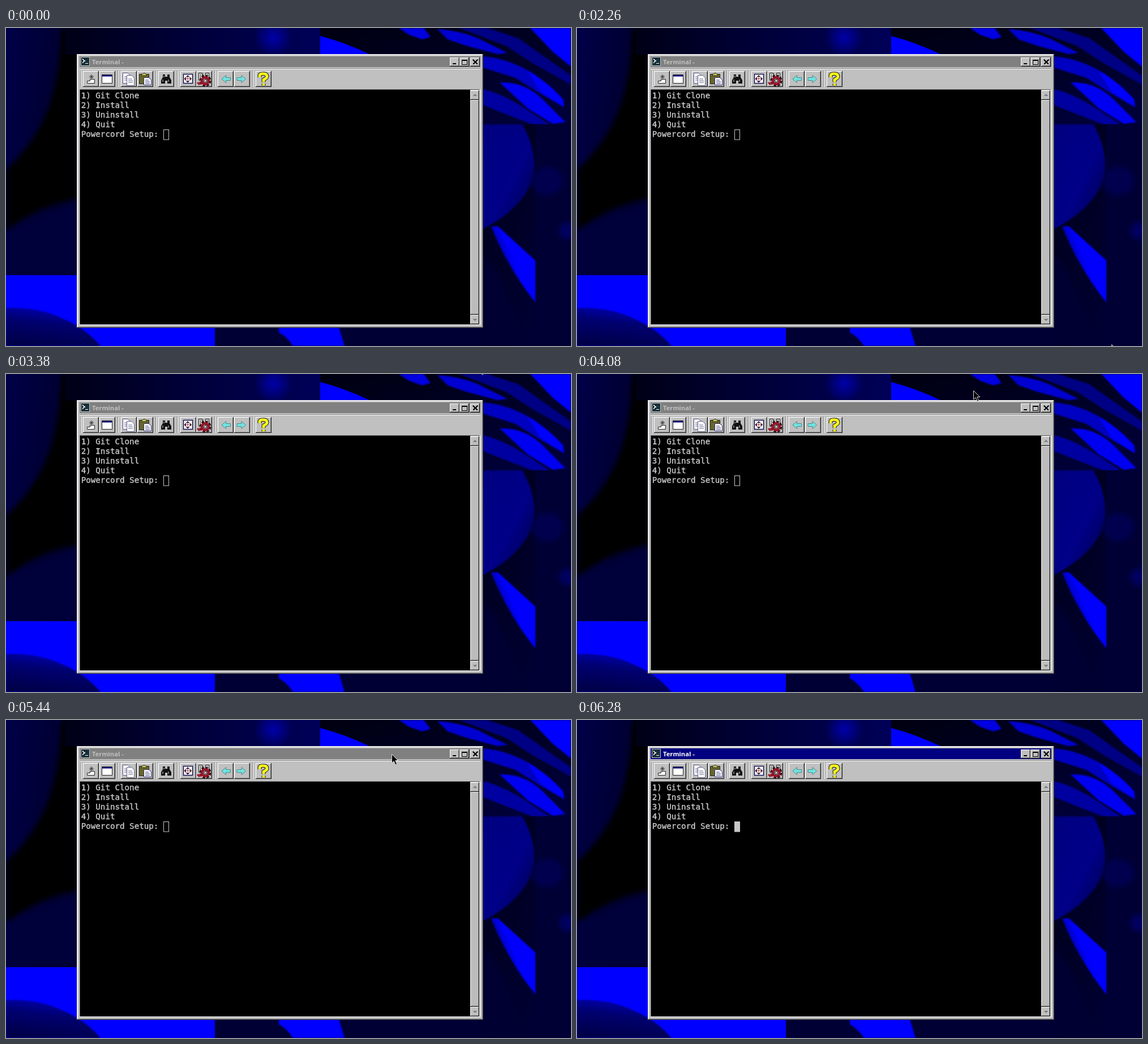
Write an HTML page that moves like this. It is 998x561 px and loops after 8000 ms.

```html
<!DOCTYPE html>
<html lang="en">
<head>
<meta charset="utf-8">
<title>Terminal</title>
<style>
  html, body { margin: 0; width: 100%; height: 100%; overflow: hidden; background: #000; }
  svg { display: block; width: 998px; height: 561px; }
  text { white-space: pre; }
  .term { font: 14.2px "DejaVu Sans Mono", monospace; fill: #c8c8c8; stroke: #c8c8c8; stroke-width: .4; }
  .title { font: bold 11.2px "Noto Sans", sans-serif; }
</style>
</head>
<body>
<svg id="stage" viewBox="0 0 998 561">
  <defs>
    <linearGradient id="left" x2="1" y2=".4"><stop stop-color="#000048"/><stop offset="1" stop-color="#000028"/></linearGradient>
    <linearGradient id="top"><stop stop-color="#000016"/><stop offset=".4" stop-color="#000034"/><stop offset="1" stop-color="#000058"/></linearGradient>
    <radialGradient id="spot"><stop stop-color="#0000a8"/><stop offset="1" stop-color="#0000a8" stop-opacity="0"/></radialGradient>
    <linearGradient id="orb" y2="1"><stop stop-color="#000080"/><stop offset=".55" stop-color="#000088"/><stop offset="1" stop-color="#000048"/></linearGradient>
    <linearGradient id="low" y2="1"><stop stop-color="#000018"/><stop offset="1" stop-color="#00003c"/></linearGradient>
    <linearGradient id="hand" x2=".7" y2="1"><stop stop-color="#000010"/><stop offset="1" stop-color="#000038"/></linearGradient>
    <linearGradient id="shard" x1=".2" y1=".75" x2=".55" y2=".5"><stop stop-color="#000050"/><stop offset="1" stop-color="#0000fc"/></linearGradient>
    <linearGradient id="mound" x1=".6" y1="0" x2=".3" y2="1"><stop stop-color="#0000b8"/><stop offset=".4" stop-color="#000070"/><stop offset="1" stop-color="#000048"/></linearGradient>
    <filter id="soft" x="-20%" y="-20%" width="140%" height="140%"><feGaussianBlur stdDeviation="5"/></filter>
    <filter id="edge"><feGaussianBlur stdDeviation="1.2"/></filter>
    <clipPath id="corner"><path d="M555 0H998V170H555Z"/></clipPath>
  </defs>

  <!-- wallpaper -->
  <rect width="998" height="561" fill="#000020"/>
  <rect width="126" height="437" fill="url(#left)"/>
  <path d="M104 0H126V300Q60 312 0 358V250Q54 200 76 138Q96 80 98 0Z" fill="#000004" filter="url(#soft)"/>
  <path d="M0 372Q62 325 126 306V436H0Z" fill="#00003a" filter="url(#soft)"/>
  <rect x="104" width="452" height="47" fill="url(#top)"/>
  <circle cx="472" cy="17" r="34" fill="url(#spot)"/>
  <g clip-path="url(#corner)">
    <rect x="555" width="443" height="170" fill="url(#hand)"/>
    <path d="M555 14Q600 26 644 47H555Z" fill="#00f"/>
    <g filter="url(#edge)">
      <path d="M694 0H738L750 16 735 20 712 12Z" fill="#0000e0"/>
      <path d="M762 2Q800 4 834 18L886 44 868 46 812 31 780 20Z" fill="#0000d0"/>
      <path d="M800 0H850L905 18 950 50 998 84V100L930 62 884 32Z" fill="#000084"/>
      <path d="M926 0H998V68L966 42Z" fill="#00f"/>
      <path d="M843 50Q890 54 934 82L984 126 986 140 944 116 900 88 843 70Z" fill="#0000c0"/>
      <path d="M922 76Q956 94 984 126L985 139 944 112Z" fill="#00f"/>
      <path d="M872 96Q914 94 946 124L988 166 966 169 922 142Z" fill="#0000f0"/>
      <path d="M843 108Q884 118 932 152L960 170H930L878 150 843 136Z" fill="#0000a0"/>
    </g>
  </g>
  <rect x="842" y="170" width="156" height="391" fill="url(#low)"/>
  <path d="M842 170H912Q940 220 931 264Q914 318 842 355Z" fill="url(#orb)" filter="url(#edge)"/>
  <rect x="935" y="170" width="63" height="391" fill="#000034"/>
  <ellipse cx="956" cy="270" rx="28" ry="25" fill="#000050" filter="url(#soft)"/>
  <ellipse cx="992" cy="358" rx="15" ry="15" fill="#000060" filter="url(#soft)"/>
  <path d="M857 350H869L935 410V484Q908 450 890 418Q870 384 857 350Z" fill="url(#shard)" filter="url(#edge)"/>
  <path d="M842 400Q885 440 916 561H842Z" fill="#000030" filter="url(#soft)"/>
  <rect y="436" width="369" height="125" fill="#00f"/>
  <path d="M0 494Q58 492 99 512Q139 528 167 561H0Z" fill="url(#mound)" filter="url(#edge)"/>
  <rect x="369" y="528" width="474" height="33" fill="#000034"/>
  <path d="M482 528H588L598 561H507Q497 545 482 537Z" fill="#00f" filter="url(#edge)"/>

  <g id="window" shape-rendering="crispEdges"></g>

  <text class="title" id="title" x="152" y="63.5">Terminal -</text>
  <g id="lines" class="term"></g>
  <rect id="caret" x="278.5" y="179.5" width="9" height="17.5" stroke="#c8c8c8"/>

  <!-- toolbar icons -->
  <g>
    <path d="M143.500 97.500V93.500H148.500V90.500H156.500V97.500Z" fill="#fff" stroke="#222"/>
    <path d="M151 82V90M147 86H155M148.500 83.500L153.500 88.500M153.500 83.500L148.500 88.500" stroke="#333"/>
    <path d="M169.500 82.500H187.500V97.500H169.500Z" fill="#fff" stroke="#222"/>
    <path d="M170 83H187V85.500H170Z" fill="#000080"/>
    <g fill="#fff" stroke="#606088">
      <path id="page" d="M206.500 79.500H215L219.500 84V97.500H206.500ZM209 86H216M209 89H217M209 92H217"/>
      <use href="#page" x="7" y="4"/>
    </g>
    <path d="M235.500 81.500H252.500V98.500H235.500Z" fill="#66662a" stroke="#222"/>
    <path d="M239.500 84V81H242L244 79 246 81H248.500V84Z" fill="#cccc55" stroke="#222"/>
    <path d="M243.500 87.500H252L256.500 91V100.500H243.500ZM246 92H252M246 95H254M246 98H254" fill="#fff" stroke="#333377"/>
    <path d="M277 82H281V86H285V82H289V87L292 92V98H285V93H281V98H274V92L277 87Z" fill="#111"/>
    <path d="M277 91V95M287 91V95M279 84V87" stroke="#ddd"/>
    <path d="M313.500 81.500H329.500V97.500H313.500Z" fill="#fff" stroke="#111150" stroke-width="1.500"/>
    <path d="M321 83L324.500 86.500H317.500ZM321 96.500L324.500 93H317.500ZM314.500 89.500L318 86V93ZM328 89.500L324.500 86V93Z" fill="#401830"/>
    <path d="M321 87V92M318.500 89.500H323.500" stroke="#aa3333"/>
    <g fill="none">
      <path d="M340.500 79.500H346.500V92H340.500ZM352.500 79.500H358.500V90H352.500Z" fill="#ddd" stroke="#222"/>
      <path d="M343.500 81V91M355.500 81V88M348 80V86" stroke="#444"/>
      <circle cx="352" cy="93" r="7" stroke="#301018" stroke-width="7" stroke-dasharray="3.600 1.900"/>
      <circle cx="352" cy="93" r="6" stroke="#981428" stroke-width="4"/>
      <circle cx="352" cy="93" r="2.500" fill="#ccc" stroke="#301018"/>
      <path d="M338 96L342 100M342 95L345 99" stroke="#981428" stroke-width="3"/>
    </g>
    <path id="arrow" d="M381 90L388.500 83.500V87.500H396.500V92.500H388.500V96.500Z" fill="#70e4e0" stroke="#508888"/>
    <use href="#arrow" transform="translate(804.500) scale(-1 1)"/>
    <g fill="none">
      <path id="ask" d="M448 87V84Q448 80.500 454.500 80.500Q461 80.500 461 85.500Q461 88.500 455 91V95.500M455 98V101.500" stroke="#333" stroke-width="7"/>
      <path d="M448 87V84Q448 80.500 454.500 80.500Q461 80.500 461 85.500Q461 88.500 455 91V95.500M455 98V101.500" stroke="#ffff18" stroke-width="4.600"/>
    </g>
  </g>

  <path id="pointer" d="M.5 .5V16L4 12.500 7 19 9.500 18 6.800 11.500H11.500Z" fill="#000" stroke="#d8d8d8"/>
  <g id="beam" fill="none">
    <path id="stem" d="M-4 -8.500H-1.500L0 -7 1.500 -8.500H4M0 -7V7M-4 8.500H-1.500L0 7 1.500 8.500H4" stroke="#e0e0e0" stroke-width="3.200"/>
    <path d="M-4 -8.500H-1.500L0 -7 1.500 -8.500H4M0 -7V7M-4 8.500H-1.500L0 7 1.500 8.500H4" stroke="#000"/>
  </g>
</svg>

<script>
const LOOP = 8000, FOCUS = 5480;
const $ = id => document.getElementById(id);

function add(parent, tag, attrs) {
  const el = document.createElementNS('http://www.w3.org/2000/svg', tag);
  for (const key in attrs) el.setAttribute(key, attrs[key]);
  parent.append(el);
  return el;
}

const win = $('window');
const box = (x, y, width, height, fill) => add(win, 'rect', { x, y, width, height, fill });
const mark = (d, fill, stroke, width = 1) => add(win, 'path', { d, fill, stroke, 'stroke-width': width });

function bevel(x, y, w, h, fill = '#c0c0c0') {
  box(x, y, w, h, '#202020');
  box(x, y, w - 1, h - 1, '#fff');
  box(x + 1, y + 1, w - 2, h - 2, '#808080');
  box(x + 1, y + 1, w - 3, h - 3, fill);
}

// frame and title bar
box(125, 46, 718, 483, '#404040');
box(125, 46, 717, 482, '#dcdcdc');
box(126, 47, 716, 481, '#808080');
box(126, 47, 715, 480, '#fff');
box(127, 48, 714, 479, '#c0c0c0');
const bar = box(130, 50, 708, 19, '#808080');
box(132, 51, 16, 16, '#c0c0c0');
box(133, 52, 14, 14, '#18303a');
mark('M135 55L139 58 135 61M140 62.500H145', 'none', '#fff', 1.5);
for (const x of [784, 801, 820]) bevel(x, 52, 17, 16);
box(789, 62, 6, 2, '#000');
mark('M805 56H814V64H805ZM805 57H814', 'none', '#000');
mark('M825 56L833 64M833 56L825 64', 'none', '#000', 2);

// toolbar
box(130, 71, 708, 1, '#808080');
box(130, 72, 708, 1, '#fff');
for (const x of [131, 197, 264, 302, 368, 435]) {
  box(x, 75, 1, 29, '#808080');
  box(x + 1, 75, 1, 29, '#fff');
}
for (const x of [136, 165, 203, 232, 269, 308, 336, 374, 403, 441]) bevel(x, 76, 28, 28);

// terminal and scrollbar
box(130, 108, 708, 416, '#fff');
box(130, 108, 707, 415, '#606060');
box(131, 109, 689, 414, '#000');
box(820, 109, 17, 414, '#d0d0d0');
bevel(820, 110, 16, 17);
bevel(820, 127, 16, 379, '#bcbcbc');
bevel(820, 506, 16, 17);
mark('M824 120H832L828 116Z', '#808080');
mark('M824 513H832L828 517Z', '#808080');

['1) Git Clone', '2) Install', '3) Uninstall', '4) Quit', 'Powercord Setup: '].forEach((line, i) => {
  add($('lines'), 'text', { x: 132.7, y: 123.5 + 17.1 * i }).textContent = line;
});

// pointer tracks: time, x, y
const tracks = [
  [[2260, 944, 558], [2360, 930, 535], [2600, 822, 385], [2820, 739, 275],
   [2920, 741, 262], [3080, 764, 190], [3240, 805, 80], [3380, 834, -17], [3420, 842, -40]],
  [[3900, 783, 1], [4080, 700, 29], [4240, 684, 42], [4640, 680, 55],
   [5160, 681, 60], [5500, 681, 60], [5640, 746, 108], [5840, 884, 228], [6040, 999, 338]]
];

function pointAt(t) {
  for (const track of tracks) {
    const i = track.findIndex(p => p[0] > t);
    if (i < 1) continue;
    const [a, b] = [track[i - 1], track[i]];
    const k = (t - a[0]) / (b[0] - a[0]);
    return [1, 2].map(n => Math.round(a[n] + (b[n] - a[n]) * k));
  }
  return null;
}

function place(el, point) {
  el.style.display = point ? '' : 'none';
  if (point) el.setAttribute('transform', `translate(${point})`);
}

function draw(now) {
  const t = now % LOOP;
  const focused = t >= FOCUS;
  bar.setAttribute('fill', focused ? '#000080' : '#808080');
  $('title').setAttribute('fill', focused ? '#fff' : '#c0c0c0');
  $('caret').setAttribute('fill', focused ? '#c8c8c8' : 'none');

  const p = pointAt(t);
  const inText = p && p[0] > 131 && p[0] < 820 && p[1] > 109 && p[1] < 523;
  place($('pointer'), inText ? null : p);
  place($('beam'), inText ? p : null);
  requestAnimationFrame(draw);
}
requestAnimationFrame(draw);
</script>
</body>
</html>
```
